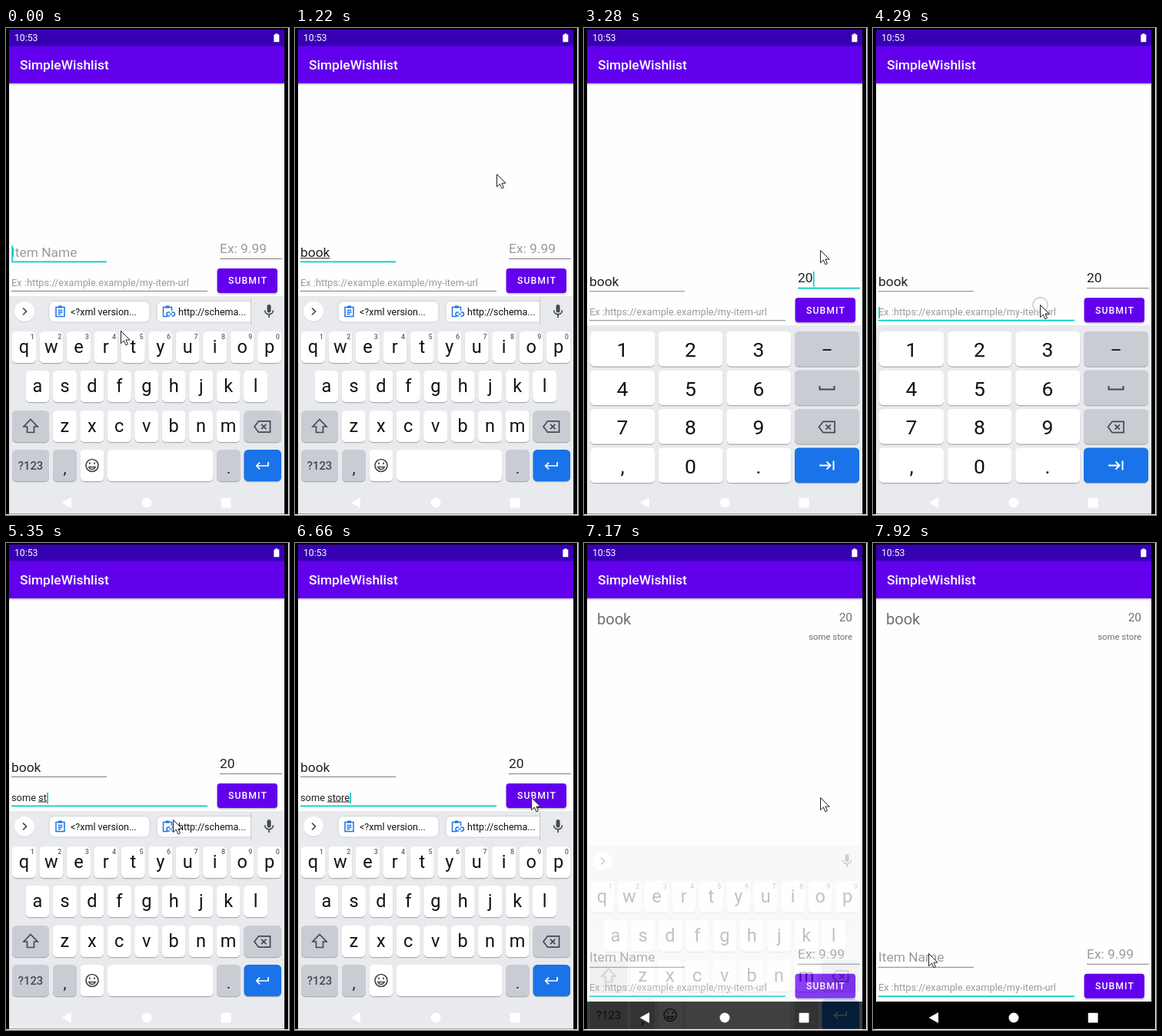
An HTML page for the animation above (8 s loop, 368 px wide and 634 px high).

```html
<!DOCTYPE html>
<html lang="en">
<head>
<meta charset="utf-8">
<title>Wishlist demo</title>
<style>
  html, body { margin: 0; width: 100%; height: 100%; overflow: hidden; background: #000; }
  svg { display: block; width: 100%; height: 100%; font-family: Roboto, sans-serif; }
  text { white-space: pre; }
  .mid { text-anchor: middle; }
  .icon { fill: none; stroke-width: 1.7; stroke: #45484c; }
</style>
</head>
<body>
<svg id="stage" viewBox="0 0 368 634">
  <defs>
    <clipPath id="screen"><rect x="4" y="2" width="358" height="630.5"/></clipPath>
    <clipPath id="strip"><rect x="50" y="350" width="268" height="38"/></clipPath>
    <linearGradient id="shade" x2="0" y2="1">
      <stop stop-color="#000" stop-opacity=".28"/><stop offset="1" stop-color="#000" stop-opacity="0"/>
    </linearGradient>
  </defs>
</svg>
<script>
const LOOP = 8000;
const INK = '#212121', HINT = '#9b9b9b', TEAL = '#03d1c0', GREY = '#808080';
const PANEL = '#e8eaed', SOFT = '#c9ccd3', BLUE = '#1a73e8', DARK = '#45484c';
const stage = document.getElementById('stage');

function add(parent, tag, attrs = {}, content) {
  const el = document.createElementNS('http://www.w3.org/2000/svg', tag);
  set(el, attrs);
  if (content !== undefined) el.textContent = content;
  parent.append(el);
  return el;
}
function set(el, attrs) {
  for (const name in attrs) el.setAttribute(name, attrs[name]);
}
const show = (el, on) => { el.style.display = on ? '' : 'none'; };
const rect = (p, x, y, width, height, fill, rx = 0) => add(p, 'rect', { x, y, width, height, fill, rx });
const path = (p, d, attrs = { class: 'icon' }) => add(p, 'path', { d, ...attrs });
const label = (p, x, y, size, fill, str, attrs = {}) =>
  add(p, 'text', { x, y, 'font-size': size, fill, ...attrs }, str);
const group = (p, attrs) => add(p, 'g', attrs);

// ---- App ----
const screen = group(stage, { 'clip-path': 'url(#screen)' });
rect(screen, 4, 2, 358, 631, '#fefefe');
rect(screen, 4, 72, 358, 3, 'url(#shade)');
rect(screen, 4, 2, 358, 22, '#3700b3');
rect(screen, 4, 23.5, 358, 48.5, '#6200ee');
label(screen, 11, 17.3, 12.2, '#fff', '10:53');
path(screen, 'M348.3 8.6h2v-1.3h3v1.3h2v9.6h-7z', { fill: '#fff' });
label(screen, 18, 54, 17.4, '#fff', 'SimpleWishlist', { 'font-weight': 500 });

const entry = group(screen);
label(entry, 17, 106, 20, '#6f6f6f', 'book');
label(entry, 349, 101.5, 15.4, '#6f6f6f', '20', { 'text-anchor': 'end' });
label(entry, 349, 126, 11.35, '#6f6f6f', 'some store', { 'text-anchor': 'end' });

const form = group(screen);
const button = group(form);
rect(button, 275, 315, 78, 32, '#000', 4).setAttribute('opacity', .18);
rect(button, 274.5, 313, 78.5, 32, '#6200ee', 4);
label(button, 289, 333.4, 12.2, '#fff', 'SUBMIT', { 'font-weight': 500, 'letter-spacing': 1.09 });

function makeField(x, right, baseline, lineY, size, hint) {
  const text = label(form, x, baseline, size, HINT, hint);
  const mark = rect(form, x, baseline + (size > 15 ? 1.5 : 1), 0, 1, INK);
  const line = rect(form, x, lineY, right - x, 1, GREY);
  const caret = rect(form, x, baseline - size * .83, 1.7, size * 1.15, TEAL);

  return ({ value, from, to, focused, blink }) => {
    const shown = value || hint;
    if (text.textContent !== shown) text.textContent = shown;
    const widthTo = n => n > 0 ? text.getSubStringLength(0, n) : 0;
    set(text, { fill: value ? INK : HINT });
    set(mark, { x: x + widthTo(from), width: to > from ? widthTo(to) - widthTo(from) : 0 });
    set(line, { fill: focused ? TEAL : GREY, y: focused ? lineY - .5 : lineY, height: focused ? 1.8 : 1 });
    set(caret, { x: x + widthTo(value.length) + .3 });
    show(caret, blink);
  };
}
const drawName = makeField(7, 131, 297.7, 304, 17.4, 'Item Name');
const drawPrice = makeField(278, 359, 293.2, 300, 17.4, 'Ex: 9.99');
const drawLink = makeField(7, 262, 335.5, 342, 12.8, 'Ex :https://example.example/my-item-url');

rect(screen, 4, 597, 358, 37, '#000');

// ---- Keyboards ----
function key(p, x, y, w, h, fill = '#fff') {
  rect(p, x, y + 1.2, w, h, '#a9acb0', 5.5);
  rect(p, x, y, w, h, fill, 5.5);
}
function backspace(p, x, y) {
  path(p, `M${x - 10.5} ${y}l5.5-7.2h15v14.4h-15zM${x - 1.5} ${y - 3.2}l6.4 6.4m0-6.4l-6.4 6.4`);
}
function clipboard(p, x) {
  const blue = { fill: 'none', stroke: BLUE, 'stroke-width': 1.5 };
  path(p, `M${x} 363.5h11v12h-11z`, blue);
  path(p, `M${x + 3.2} 361.5h4.6v3h-4.6z`, { fill: BLUE });
  return blue;
}

const letters = group(screen);
rect(letters, 4, 349, 358, 320, PANEL);
add(letters, 'circle', { cx: 24, cy: 370, r: 13, fill: '#cfd1d4' });
add(letters, 'circle', { cx: 24, cy: 369, r: 13, fill: '#fff' });
path(letters, 'M22 364.5l4.5 4.5l-4.5 4.5');
rect(letters, 339.5, 360, 5, 10.5, DARK, 2.5);
path(letters, 'M336.6 367.5c0 7 10.8 7 10.8 0M342 373v4');

const chips = group(letters);
const chipRow = group(chips, { 'clip-path': 'url(#strip)' });
for (const [x, w, str] of [[56, 131, '<?xml version...'], [196, 140, 'http://schema...']]) {
  set(rect(chipRow, x, 355.5, w, 27.5, '#fff', 7), { stroke: '#cdd0d4' });
  label(chipRow, x + 28, 374, 12.5, '#111', str);
}
path(chipRow, 'M67.5 367.5h6M67.5 370h6M67.5 372.5h4', clipboard(chipRow, 65));
const linkBlue = clipboard(chipRow, 204.5);
rect(chipRow, 210, 368, 9, 9, '#fff');
path(chipRow, 'M213 370h-1.5a2.3 2.3 0 0 0 0 5h1.5m2.5-5h1.5a2.3 2.3 0 0 1 0 5h-1.5m-3-2.5h3.5', linkBlue);
rect(chips, 318, 351, 1, 36, '#c4c7cb');

const rows = [['qwertyuiop', 23.5, 395], ['asdfghjkl', 41, 446], ['zxcvbnm', 76.3, 498]];
for (const [chars, start, y] of rows) {
  [...chars].forEach((char, i) => {
    const x = start + 35.45 * i;
    key(letters, x - 15.5, y, 31, 41);
    label(letters, x, y + 28.3, 23.5, '#111', char, { class: 'mid' });
    if (y === 395) {
      label(letters, x + 10.8, y + 10, 9, '#5f6368', (i + 1) % 10, { class: 'mid', 'font-weight': 500 });
    }
  });
}
key(letters, 8, 498, 48, 41, SOFT);
path(letters, 'M32 509.5l9 9.5h-4.5v7.5h-9v-7.5h-4.5z');
key(letters, 309.5, 498, 48.5, 41, SOFT);
backspace(letters, 333.5, 519);
key(letters, 8, 549, 48, 41, SOFT);
label(letters, 32, 575, 14.8, DARK, '?123', { class: 'mid', 'font-weight': 500 });
key(letters, 61, 549, 31, 41, SOFT);
label(letters, 76.5, 580, 21, '#222', ',', { class: 'mid' });
key(letters, 96.5, 549, 31, 41);
add(letters, 'circle', { cx: 112, cy: 569.5, r: 8, class: 'icon' });
path(letters, 'M107.8 571.5c1.8 4 6.6 4 8.4 0zM109 565.5v2.4M115 565.5v2.4');
key(letters, 132, 549, 137.5, 41);
key(letters, 274, 549, 31, 41, SOFT);
label(letters, 289.5, 580, 21, '#222', '.', { class: 'mid' });
key(letters, 309.5, 549, 48.5, 41, BLUE);
path(letters, 'M341 565v5h-15m4-4.3l-4.3 4.3l4.3 4.3', { class: 'icon', style: 'stroke:#fff' });

const digits = group(screen);
rect(digits, 4, 387, 358, 246, PANEL);
['123', '456', '789', ',0.'].forEach((chars, r) => {
  const y = 395 + 50.5 * r;
  [...chars].forEach((char, c) => {
    key(digits, 8 + 88.6 * c, y, 84, 45.5);
    label(digits, 50 + 88.5 * c, y + 33, 26.5, '#111', char, { class: 'mid' });
  });
  key(digits, 274, y, 84, 45.5, r < 3 ? SOFT : BLUE);
});
path(digits, 'M310.5 419h11', { class: 'icon', style: 'stroke:#222;stroke-width:2' });
path(digits, 'M306.5 466v4.5h19v-4.5', { class: 'icon', style: 'stroke-width:2' });
backspace(digits, 316, 519.5);
path(digits, 'M306 569.5h14.5m-5-5l5 5l-5 5M324.5 563.5v12', { class: 'icon', style: 'stroke:#fff;stroke-width:2' });

path(screen, 'M72.5 618l12.5-7v14z', { fill: '#fff' });
add(screen, 'circle', { cx: 183, cy: 618, r: 6.5, fill: '#fff' });
rect(screen, 279.7, 611.8, 12.8, 12.8, '#fff', 1);
rect(stage, 367, 0, 1, 634, '#fff');
rect(stage, 0, 633, 368, 1, '#fff');

// ---- Pointer ----
const touch = add(stage, 'circle', { r: 9.6, fill: '#fff', 'fill-opacity': .55, stroke: '#c9c8e2', 'stroke-width': 1.6 });
const pointer = path(stage, 'M.5.5v16.2l3.8-3.6l2.5 5.7l2.6-1.1l-2.5-5.6h5.2z',
  { fill: '#fff', stroke: '#222', 'stroke-linejoin': 'round' });

// ---- Timeline: each row starts at its time in ms ----
// text rows: time, value, start and end of the composing underline
const NAME = [[0, '', 0, 0], [140, 'b', 0, 0], [280, 'bo', 0, 1], [410, 'boo', 0, 2], [560, 'book', 0, 3],
  [820, 'book', 0, 4], [2330, 'book', 0, 0], [7050, '', 0, 0]];
const PRICE = [[0, '', 0, 0], [3150, '2', 0, 0], [3280, '20', 0, 0], [7050, '', 0, 0]];
const LINK = [[0, '', 0, 0], [4560, 's', 0, 1], [4730, 'so', 0, 2], [4850, 'som', 0, 3], [4970, 'some', 0, 4],
  [5090, 'some s', 5, 6], [5350, 'some st', 5, 7], [5630, 'some stor', 5, 8], [5910, 'some stor', 5, 9],
  [6160, 'some store', 5, 9], [6300, 'some store', 5, 10], [7050, '', 0, 0]];
const POINTER = [[0, 149, 394], [1220, 262, 190], [1340, 322, 134], [1460, 343, 217], [1610, 322, 270],
  [1730, 310, 286], [1850, 307, 289], [3780, 285, 308], [3900, 243, 342], [4020, 220, 358], [4170, 217, 360],
  [6160, 258, 344], [6300, 284, 337], [6420, 299, 333], [6540, 307, 331], [7290, 295, 362], [7410, 242, 452],
  [7530, 182, 540], [7650, 136, 574], [7800, 92, 553], [7920, 72, 534]];
const FORM_Y = [[0, 0], [2330, 38.3], [4410, 0], [7050, 247.8]];
// keyboard rows: time, drop, opacity
const SLIDE = [[0, 0, 1], [7050, 13.5, .73], [7170, 45, .25], [7290, 60, 0]];

const at = (track, t) => track.findLast(row => row[0] <= t).slice(1);
const within = (t, ...spans) => spans.some(([a, b]) => t >= a && t < b);

function field(draw, track, t, focus, blink) {
  const [value, from, to] = at(track, t);
  draw({ value, from, to, focused: within(t, focus), blink: within(t, ...blink) });
}

function render(t) {
  field(drawName, NAME, t, [0, 2330], [[0, 1220]]);
  field(drawPrice, PRICE, t, [2090, 4290], [[2090, 2880], [3150, 3780]]);
  field(drawLink, LINK, t, [4290, LOOP], [[4290, 7050]]);
  set(form, { transform: `translate(0 ${at(FORM_Y, t)[0]})` });
  show(entry, t >= 7170);

  const numeric = within(t, [2330, 4410]);
  const [drop, opacity] = at(SLIDE, t);
  show(digits, numeric);
  show(letters, !numeric && opacity > 0);
  show(chips, t < 7050);
  set(letters, { transform: `translate(0 ${drop})`, opacity });

  const [x, y] = at(POINTER, t);
  set(pointer, { transform: `translate(${x} ${y})` });
  set(touch, { cx: x + .5, cy: y + .5 });
  show(touch, within(t, [2090, 2480], [4170, 4560], [6930, 7170]));
}

const start = performance.now();
function tick() {
  render((performance.now() - start) % LOOP);
  requestAnimationFrame(tick);
}
tick();
</script>
</body>
</html>
```
